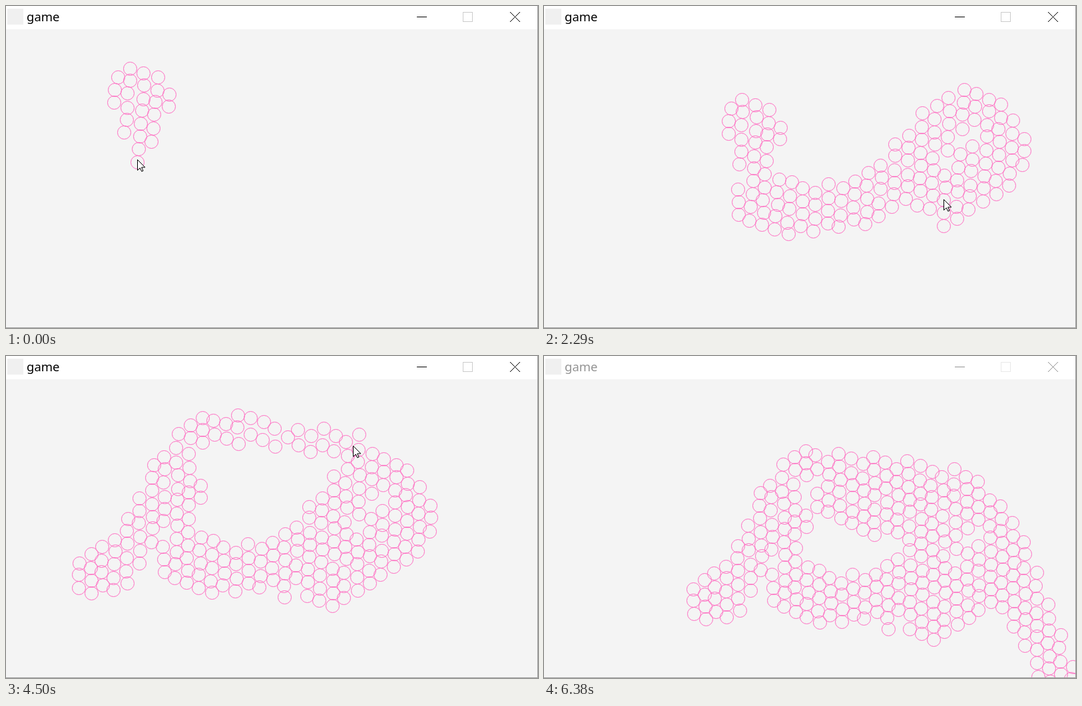
These frames come from a looping animation (799x485 px, 6480 ms). An HTML page:

```html
<!DOCTYPE html>
<html lang="en">
<head>
<meta charset="utf-8">
<title>game</title>
<style>
  html, body { margin: 0; width: 100%; height: 100%; overflow: hidden; background: #f4f4f4; }
  svg { display: block; width: 799px; height: 485px; }
  text { font: 18.5px "Noto Sans", "Open Sans", sans-serif; }
</style>
</head>
<body>
<svg viewBox="0 0 799 485">
  <defs><clipPath id="view"><rect y="35" width="798" height="449"/></clipPath></defs>
  <rect width="799" height="485" fill="#f4f4f4"/>
  <g clip-path="url(#view)">
    <path id="balls" fill="none" stroke="#ff6dc2"/>
    <path id="cursor" d="M.5 .5V16.5L4.3 13L6.8 18.2L9 17.2L6.6 12H11.8Z" fill="#fff" stroke="#000"/>
  </g>
  <rect width="799" height="35" fill="#fff"/>
  <rect x="2" y="4" width="24" height="24" fill="#f0f0f0"/>
  <g id="caption">
    <text x="31" y="23">game</text>
    <path d="M617 16.5H632M757 9L772 24M772 9L757 24" stroke="#000" fill="none"/>
    <rect x="686.5" y="9.5" width="14" height="14" fill="none" stroke="#ccc"/>
  </g>
  <path d="M798.5 0V485M0 484.5H799" stroke="#a0a0a0"/>
</svg>
<script>
const DURATION = 6480, END = 6380, RADIUS = 10;
const CENTRE = [480, 280];

const clamp = s => Math.min(1, Math.max(0, s));
const smooth = s => (s = clamp(s), s * s * (3 - 2 * s));
const bell = s => Math.exp(-s * s);

// Smooth track through key points [time, ...values], without overshoot.
function track(...keys) {
  const last = keys.length - 1;
  const secant = (i, d) => (keys[i + 1][d] - keys[i][d]) / (keys[i + 1][0] - keys[i][0]);
  const tangent = (i, d) => {
    if (i === 0) return secant(0, d);
    if (i === last) return secant(last - 1, d);
    const a = secant(i - 1, d), b = secant(i, d);
    return a * b > 0 ? 2 * a * b / (a + b) : 0;
  };
  return t => {
    let i = 0;
    while (i < last - 1 && t > keys[i + 1][0]) i++;
    const p = keys[i], q = keys[i + 1], span = q[0] - p[0];
    const s = clamp((t - p[0]) / span), r = 1 - s;
    return p.slice(1).map((v, k) => {
      const d = k + 1;
      return v * (1 + 2 * s) * r * r + q[d] * s * s * (3 - 2 * s)
        + span * s * r * (tangent(i, d) * r - tangent(i + 1, d) * s);
    });
  };
}

// Drift of the body's centre
const driftAt = track(
  [0, 345, 164], [660, 353, 193], [1320, 387, 213], [1730, 415, 205], [2780, 466, 234],
  [3570, 422, 257], [3980, 386, 254], [4500, 383, 233], [5520, 441, 249], [END, ...CENTRE]
);

// Cursor x, y and the radius it fills with balls
const brushAt = track(
  [-300, 205, 136, 48], [0, 197, 231, 16], [250, 215, 255, 44], [660, 325, 280, 40],
  [1000, 430, 262, 38], [1500, 597, 143, 34], [1730, 676, 198, 20], [2000, 655, 230, 42],
  [2450, 570, 325, 45], [2650, 545, 358, 12], [2780, 315, 376, 0], [3400, 135, 372, 0],
  [3570, 131, 366, 13], [3720, 175, 345, 36], [4000, 225, 225, 18], [4250, 320, 118, 24],
  [4500, 521, 135, 20], [4900, 625, 235, 30], [5200, 665, 325, 36], [5520, 732, 432, 30],
  [5800, 752, 510, 20]
);

// The body starts stretched and skewed, with a raised arch, and contracts into its rest shape.
function poseAt(t) {
  const [cx, cy] = driftAt(t);
  const strain = clamp(1 - t / END);
  const stretch = 1 + .2 * strain, skew = .11 * strain;
  const arch = 16 * (1 - smooth((t - 4500) / 1500));
  return ([px, py]) => {
    const x = px - CENTRE[0];
    const y = py - CENTRE[1] - arch * bell(x / 90) * bell((py - 160) / 35);
    return [cx + stretch * x - skew * y, cy + y - skew * x];
  };
}

let seed = 7;
const random = () => (seed = seed * 16807 % 2147483647) / 2147483647;
const jitter = () => (random() - .5) * 3.5;

// Slanted hexagonal lattice around the centre
const balls = [];
for (let i = -20; i <= 20; i++)
  for (let j = -20; j <= 20; j++)
    balls.push({
      at: [
        CENTRE[0] + 17.2 * i + .3 * j + jitter(),
        CENTRE[1] + 8.3 * i + 19.4 * (j - Math.round(i * .43)) + jitter()
      ],
      birth: Infinity
    });

// A ball is born when the brush first reaches it.
for (let t = -300; t <= END; t += 15) {
  const pose = poseAt(t), [bx, by, reach] = brushAt(t);
  for (const ball of balls) {
    if (ball.birth < Infinity) continue;
    const [x, y] = pose(ball.at);
    if (Math.hypot(x - bx, y - by) < reach) ball.birth = t;
  }
}

// The hollow under the arch closes from its rim inwards.
for (const ball of balls) {
  const [x, y] = ball.at;
  const depth = 1 - Math.hypot((x - 504) / 100, (y - 210) / 60);
  if (depth > 0) ball.birth = Math.min(ball.birth, 4600 + 1500 * depth);
}

const $ = id => document.getElementById(id);
const ring = ([x, y]) =>
  `M${Math.round(x) + .5 - RADIUS} ${Math.round(y) + .5}` +
  `a${RADIUS} ${RADIUS} 0 1 0 ${2 * RADIUS} 0a${RADIUS} ${RADIUS} 0 1 0 ${-2 * RADIUS} 0`;

function render(t) {
  const time = Math.min(t, END);
  const pose = poseAt(time), [x, y] = brushAt(time).map(Math.round);
  const born = balls.filter(ball => ball.birth <= time);
  $("balls").setAttribute("d", born.map(ball => ring(pose(ball.at))).join(""));
  $("cursor").setAttribute("transform", `translate(${x} ${y})`);
  $("caption").setAttribute("opacity", t >= END ? .42 : 1);
}

const began = performance.now();
function tick() {
  render((performance.now() - began) % DURATION);
  requestAnimationFrame(tick);
}
tick();
</script>
</body>
</html>
```
